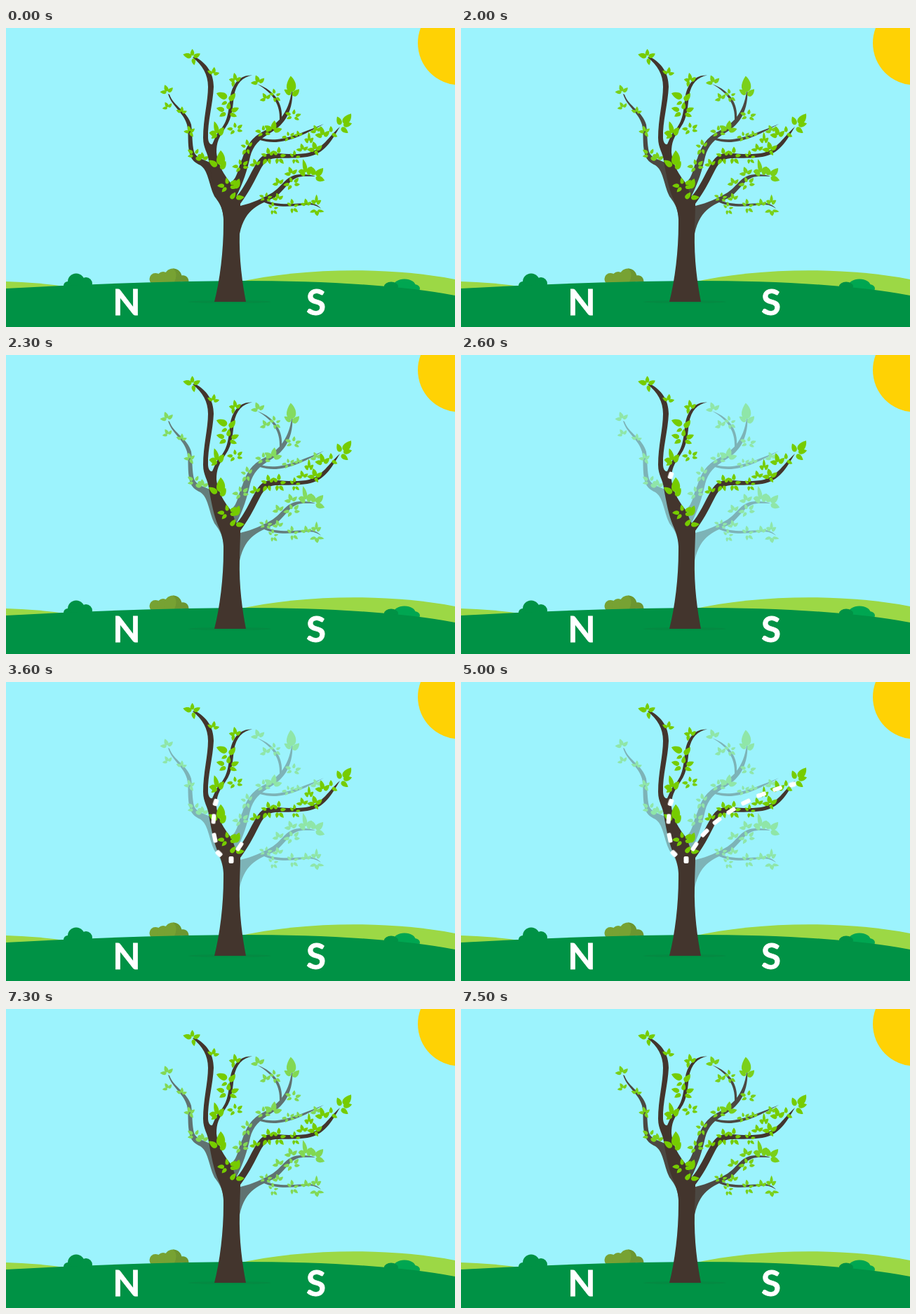
Recreate the animation shown at these times as an HTML page without scripts. Size 640x427 px, loop 7600 ms.

```html
<!DOCTYPE html>
<html lang="en">
<head>
<meta charset="utf-8">
<title>Tree pruning</title>
<style>
  html, body { margin: 0; width: 100%; height: 100%; overflow: hidden; background: #9cf3fd; }
  svg { display: block; width: 100%; height: 100%; }
  .bark { fill: #43352d; }
  .leaves { fill: #76cc00; }
  .label { font: 700 51px Lato, sans-serif; fill: #fff; stroke: #fff; stroke-width: .8; text-anchor: middle; }

  .pruned { animation: fade 7.6s infinite; }
  .cut { animation: cut 7.6s step-end infinite; }
  .cut rect {
    x: -7px; y: -3px; width: 14px; height: 6px; rx: 2px;
    fill: #fff; opacity: 0;
    animation: dash 7.6s calc(2.599s + var(--i) * .2s) step-end infinite;
  }
  .cut .short { x: -5px; y: -3.5px; width: 10px; height: 7px; }

  @keyframes fade {
    0% { opacity: 1; animation-timing-function: step-end; }
    26.31% { opacity: .9; animation-timing-function: steps(6); }
    34.21% { opacity: .34; animation-timing-function: step-end; }
    92.1% { opacity: .34; animation-timing-function: steps(5); }
    98.68% { opacity: .9; animation-timing-function: step-end; }
    100% { opacity: 1; }
  }
  /* Each dash starts on its own delay; the group hides them all together. */
  @keyframes dash { 0% { opacity: 1; } 58%, 100% { opacity: 0; } }
  @keyframes cut { 0% { opacity: 0; } 34.2% { opacity: 1; } 92.1%, 100% { opacity: 0; } }
</style>
</head>
<body>
<svg viewBox="0 0 640 427" preserveAspectRatio="none">
  <defs>
    <path id="leaf" d="M1.500.5C1.500-3.500 6-3.600 11-.5C8 3.300 2.500 4.200 1.500.5Z"/>
    <g id="sprig">
      <use href="#leaf" transform="rotate(-92)scale(1.100)"/>
      <use href="#leaf" transform="rotate(-160)"/>
      <use href="#leaf" transform="rotate(-25)"/>
    </g>
    <g id="spray">
      <use href="#leaf" transform="translate(0 -2)rotate(-85)scale(.9)"/>
      <use href="#leaf" transform="translate(-3 -1)rotate(-165)"/>
      <use href="#leaf" transform="translate(-1 1)rotate(150)scale(.9)"/>
      <use href="#leaf" transform="translate(3 -1)rotate(-25)"/>
      <use href="#leaf" transform="translate(2 1)rotate(22)scale(.9)"/>
    </g>
  </defs>

  <rect width="640" height="427" fill="#9cf3fd"/>
  <circle cx="647" cy="21.500" r="60" fill="#ffd204"/>

  <g fill="#9cd845">
    <path d="M0 362Q45 363 90 370V390H0Z"/>
    <path d="M330 363C420 343 540 340 640 359V400H330Z"/>
  </g>
  <g fill="#77a233">
    <circle cx="213" cy="358.500" r="8.500"/>
    <circle cx="224" cy="357" r="9"/>
    <circle cx="238" cy="356" r="12.500"/>
    <path fill="#6c9630" d="M238 343.500a12.500 12.500 0 0 1 12.500 10c6-1 10 3 10 9H240Q246 350 238 343.500Z"/>
  </g>
  <g fill="#00a651">
    <ellipse cx="568" cy="369" rx="16" ry="10.500"/>
    <ellipse cx="582" cy="372" rx="8" ry="6"/>
  </g>
  <g fill="#009245">
    <circle cx="100" cy="362.500" r="12"/>
    <circle cx="114" cy="365" r="9"/>
    <circle cx="88" cy="368" r="6"/>
    <ellipse cx="549" cy="369" rx="10" ry="6.500"/>
    <path d="M0 372Q190 362 330 361Q530 361 640 382V427H0Z"/>
  </g>
  <ellipse cx="319" cy="391" rx="59" ry="2" fill="#048a42"/>

  <text class="label" x="172" y="409.500">N</text>
  <text class="label" x="442" y="409.500">S</text>

  <g class="pruned">
    <g class="bark">
      <path d="M311 285C311 250 299 246 296 238C289 222 288 203 277 196C270 193 264 188 262 180C258 165 261 150 258 138C253 120 236 112 231 94L233 95C239 112 259 119 264 138C266 152 265 165 268 177C271 186 283 188 290 192L316 250Z"/>
      <path d="M320 221C331 214 331 197 337 186C343 168 350 156 368 147C390 136 405 118 408 83C411 118 397 138 378 149C361 159 352 168 348 184C344 202 338 222 328 241Z"/>
      <path d="M390 131C391 110 381 93 358 80C385 90 395 110 393 130Z"/>
      <path d="M360 156C385 164 405 157 453 137C412 160 388 168 362 160Z"/>
      <path d="M325 254H334C352 250 366 243 380 235C395 225 400 209 420 209C432 209 436 210 441 212C430 212 421 211 414 214C402 219 397 232 383 242C363 252 341 256 333 294H325Z"/>
      <path d="M367 245C385 254 410 251 425 250C437 249 444 252 449 258C440 251 431 252 422 253C405 255 384 257 366 248Z"/>
    </g>
    <g class="leaves">
      <use href="#sprig" transform="translate(230 92)rotate(-15)scale(.95)"/>
      <use href="#sprig" transform="translate(231 114)rotate(-25)scale(.75)"/>
      <use href="#sprig" transform="translate(250 121)rotate(10)scale(.75)"/>
      <use href="#sprig" transform="translate(262 149)rotate(-10)scale(.8)"/>
      <use href="#leaf" transform="translate(262 148)rotate(60)scale(.8)"/>
      <use href="#spray" transform="translate(269 182)rotate(25)scale(.9)"/>
      <use href="#sprig" transform="translate(280 188)scale(.9)"/>
      <use href="#spray" transform="translate(344 171)rotate(-70)scale(.85)"/>
      <use href="#spray" transform="translate(335 198)rotate(-15)scale(.9)"/>
      <use href="#spray" transform="translate(367 149)rotate(-5)scale(.85)"/>
      <use href="#sprig" transform="translate(380 147)rotate(15)scale(1.250)"/>
      <use href="#sprig" transform="translate(360 79)rotate(-15)"/>
      <use href="#sprig" transform="translate(371 102)rotate(-25)scale(.85)"/>
      <use href="#spray" transform="translate(383 97)rotate(65)scale(.75)"/>
      <use href="#leaf" transform="translate(406 95)rotate(-88)scale(2.400)"/>
      <use href="#leaf" transform="translate(407 96)rotate(-140)scale(1.200)"/>
      <use href="#leaf" transform="translate(407 98)rotate(-42)scale(1.400)"/>
      <use href="#spray" transform="translate(409 126)rotate(10)scale(.85)"/>
      <use href="#spray" transform="translate(403 156)rotate(-15)scale(.7)"/>
      <use href="#sprig" transform="translate(417 154)rotate(-10)scale(.65)"/>
      <use href="#sprig" transform="translate(443 148)rotate(-20)scale(.85)"/>
      <use href="#sprig" transform="translate(389 223)rotate(-20)scale(.85)"/>
      <use href="#sprig" transform="translate(388 245)rotate(-10)scale(.8)"/>
      <use href="#sprig" transform="translate(407 209)rotate(-15)scale(.95)"/>
      <use href="#spray" transform="translate(408 223)rotate(-20)scale(.9)"/>
      <use href="#sprig" transform="translate(428 209)rotate(-10)scale(1 1.850)"/>
      <use href="#sprig" transform="translate(440 212)rotate(50)scale(1.400)"/>
      <use href="#leaf" transform="translate(440 211)rotate(-100)scale(.9)"/>
      <use href="#spray" transform="translate(370 243)rotate(10)scale(.7)"/>
      <use href="#spray" transform="translate(380 258)rotate(75)scale(.7)"/>
      <use href="#spray" transform="translate(408 255)rotate(70)scale(.8)"/>
      <use href="#sprig" transform="translate(428 253)rotate(-5)scale(.8)"/>
      <use href="#sprig" transform="translate(442 251)rotate(5)scale(.7 1.100)"/>
      <use href="#sprig" transform="translate(443 260)rotate(180)scale(1 .7)"/>
    </g>
  </g>

  <path class="bark" d="M297 391C305 360 310 318 310 280C311 262 305 250 302 243C296 228 293 212 289 190C288 178 281 172 281 157C281 130 288 105 288 84C288 66 280 53 266 42L269 41C286 50 296 64 296 84C295 108 287 135 288 156C288 163 291 167 294 166C298 158 299 152 306 145C318 130 317 115 320 96C324 78 334 67 351 67.500C337 70 328 79 325 97C323 112 323 128 313 142C303 157 300 163 300 178C302 197 314 214 321 222C325 230 326 238 329 240C340 228 347 210 357 193C364 182 371 178 385 179C400 180 420 181 432 178C452 172 459 156 476 141C466 157 457 177 434 183C416 187 398 185 384 186C371 187 366 195 360 207C352 223 345 236 334 251C334 265 333 280 333 292C332 330 337 365 342 391Z"/>

  <g class="leaves">
    <use href="#leaf" transform="translate(266 42)rotate(-160)scale(1.300)"/>
    <use href="#leaf" transform="translate(265 41)rotate(-85)"/>
    <use href="#leaf" transform="translate(266 42)rotate(-25)scale(1.100)"/>
    <use href="#leaf" transform="translate(267 42)rotate(85)"/>
    <use href="#sprig" transform="translate(295 66)rotate(15)scale(.85)"/>
    <use href="#sprig" transform="translate(327 76)rotate(-5)scale(.85 1)"/>
    <use href="#leaf" transform="translate(325 75)rotate(105)scale(.85)"/>
    <use href="#leaf" transform="translate(317 101)rotate(-153)scale(1.700)"/>
    <use href="#leaf" transform="translate(317 105)rotate(-48)scale(1.400)"/>
    <use href="#leaf" transform="translate(316 105)rotate(155)scale(.9)"/>
    <use href="#spray" transform="translate(316 120)rotate(5)scale(1.200)"/>
    <use href="#sprig" transform="translate(302 153)rotate(-12)scale(1.100 1.700)"/>
    <use href="#leaf" transform="translate(302 152)rotate(150)"/>
    <use href="#spray" transform="translate(327 145)rotate(-10)scale(.85)"/>
    <use href="#leaf" transform="translate(305 199)rotate(-85)scale(2.200)"/>
    <use href="#leaf" transform="translate(302 199)rotate(-140)scale(1.500)"/>
    <use href="#leaf" transform="translate(305 203)rotate(-55)scale(1.400)"/>
    <use href="#spray" transform="translate(316 226)rotate(-12)scale(1.050)"/>
    <use href="#leaf" transform="translate(325 231)rotate(-62)scale(1.600)"/>
    <use href="#leaf" transform="translate(319 245)rotate(-50)scale(1.200)"/>
    <use href="#leaf" transform="translate(326 242)scale(1.250)"/>
    <use href="#sprig" transform="translate(356 196)rotate(-15)scale(.8)"/>
    <use href="#spray" transform="translate(374 184)rotate(-70)scale(.95)"/>
    <use href="#spray" transform="translate(388 183)rotate(80)scale(.95)"/>
    <use href="#spray" transform="translate(411 185)rotate(75)scale(.75)"/>
    <use href="#sprig" transform="translate(423 175)rotate(-10)scale(.85)"/>
    <use href="#sprig" transform="translate(432 163)scale(.65 1.200)"/>
    <use href="#sprig" transform="translate(441 175)rotate(-10)scale(1.100)"/>
    <use href="#leaf" transform="translate(440 174)rotate(60)scale(.85)"/>
    <use href="#sprig" transform="translate(452 155)rotate(-10)scale(1.050 1.250)"/>
    <use href="#leaf" transform="translate(479 138)rotate(-48)scale(1.850)"/>
    <use href="#leaf" transform="translate(477 140)rotate(-108)scale(1.300)"/>
    <use href="#leaf" transform="translate(479 139)rotate(-8)scale(1.300)"/>
    <use href="#leaf" transform="translate(477 141)rotate(42)scale(1.250)"/>
    <use href="#leaf" transform="translate(463 150)rotate(-88)scale(.9)"/>
    <use href="#leaf" transform="translate(464 150)rotate(35)scale(.9)"/>
  </g>

  <g class="cut">
    <rect class="short" style="--i:0" transform="translate(299 172)rotate(108)"/>
    <rect style="--i:1" transform="translate(296 195.500)rotate(95)"/>
    <rect style="--i:2" transform="translate(297.500 222.500)rotate(78)"/>
    <rect class="short" style="--i:3" transform="translate(303.500 245)rotate(45)"/>
    <rect class="short" style="--i:4" transform="translate(321 254)rotate(90)"/>
    <rect style="--i:5" transform="translate(333 235)rotate(-56)"/>
    <rect style="--i:6" transform="translate(347.500 215.500)rotate(-47)"/>
    <rect style="--i:7" transform="translate(365 198.500)rotate(-38)"/>
    <rect style="--i:8" transform="translate(385 184)rotate(-32)"/>
    <rect style="--i:9" transform="translate(406 171.500)rotate(-26)"/>
    <rect style="--i:10" transform="translate(428 161)rotate(-20)"/>
    <rect style="--i:11" transform="translate(451 152.500)rotate(-19)"/>
    <rect class="short" style="--i:12" transform="translate(472.500 146.500)rotate(-16)"/>
  </g>
</svg>
</body>
</html>
```
